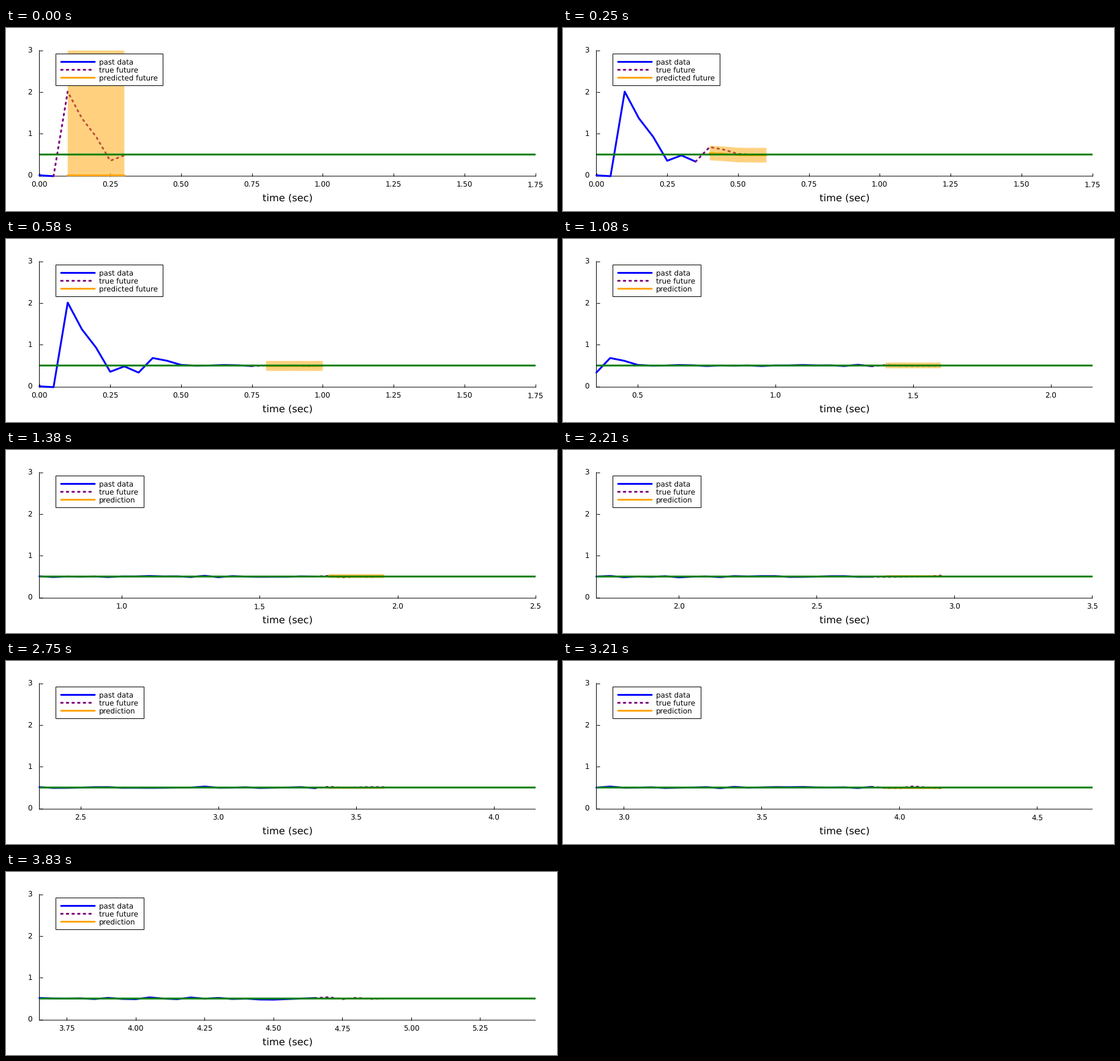
These frames come from a looping animation (900x300 px, 3.87 s). A matplotlib script:

```python
import math

import matplotlib.pyplot as plt
import numpy as np
from matplotlib.animation import FuncAnimation
from matplotlib.patches import Polygon, Rectangle

plt.rcParams.update({"font.family": "DejaVu Sans", "text.hinting": "none",
                     "path.snap": False})

W, H, DPI = 900, 300, 100
LOOP, TICK, FPS = 3870, 15, 24   # ms, ms, data steps per second
STEPS = 93
DT, AHEAD, GOAL = 0.05, 5, 0.5
SCROLL = 19                      # the view starts to follow the data here
LEFT, RIGHT, TOP, BOTTOM = 54.5, 864.5, 36.7, 242.9
YMIN, YMAX = -0.02, 3
PX = 72 / DPI
SMALL, LARGE = 11.9 * PX, 16.3 * PX

# Step response, then noise around the goal.
response = [0, -0.02, 2.01, 1.37, 0.93, 0.35, 0.48, 0.33, 0.68, 0.615, 0.515]
rng = np.random.default_rng(4)
count = STEPS + AHEAD + 1
noise = np.clip(rng.normal(0, 0.012, count - len(response)), -0.025, 0.025)
noise *= np.linspace(0.6, 1.2, len(noise))
truth = np.r_[response, GOAL + noise]
times = np.arange(count) * DT

fig = plt.figure(figsize=(W / DPI, H / DPI), dpi=DPI, facecolor="white")

ax = fig.add_axes([LEFT / W, 1 - BOTTOM / H, (RIGHT - LEFT) / W, (BOTTOM - TOP) / H])
ax.set_ylim(YMIN, YMAX)
ax.set_yticks(range(4))
ax.patch.set_visible(False)
ax.set_axisbelow(True)
ax.tick_params(direction="in", length=5 * PX, width=PX,
               labelleft=False, labelbottom=False)
for side, spine in ax.spines.items():
    spine.set_visible(side in ("left", "bottom"))
    spine.set_linewidth(PX)
    spine.set_zorder(0.6)

# Overlay in pixel units for the texts and the legend.
over = fig.add_axes([0, 0, 1, 1])
over.set_xlim(0, W)
over.set_ylim(H, 0)
over.axis("off")

SOLID = dict(lw=3 * PX, solid_capstyle="round", solid_joinstyle="round")
DASHED = dict(lw=3 * PX, ls=(0, (2.6 / 3, 6.6 / 3)),
              dash_capstyle="round", dash_joinstyle="round")


def label(x, y, s, ha="left", size=SMALL):
    return over.text(x, y, s, ha=ha, va="baseline", fontsize=size, color="black")


past, = ax.plot([], [], color="blue", zorder=2, clip_on=False, **SOLID)
future, = ax.plot([], [], color="purple", zorder=3, clip_on=False, **DASHED)
band = ax.add_patch(Polygon([[0, 0], [0, 1], [1, 1]], fc="orange", ec="none",
                            alpha=0.5, zorder=4))
guess, = ax.plot([], [], color="orange", zorder=5, clip_on=False, **SOLID)
ax.axhline(GOAL, color="green", lw=3 * PX, zorder=6)

for v in range(4):
    y = BOTTOM - (v - YMIN) / (YMAX - YMIN) * (BOTTOM - TOP)
    label(42.9, y + 4.2, str(v), "right")
label(459.8, 284, "time (sec)", "center", LARGE)
xlabels = [label(0, 261.3, "", "center") for _ in range(8)]

box = over.add_patch(Rectangle((81.5, 42.5), 175, 52, fc="white", ec="black",
                               lw=PX, zorder=1))
rows = [("blue", SOLID, "past data"), ("purple", DASHED, "true future"),
        ("orange", SOLID, "")]
for i, (color, style, name) in enumerate(rows):
    y = 55.5 + 13 * i
    over.plot([90, 145], [y, y], color=color, zorder=2, **style)
    last_name = label(152.4, y + 4.3, name)


def view(k):
    """Limits of the time axis."""
    if k < SCROLL:
        return 0, 1.75
    start = (k - SCROLL) * DT
    return start, start + 1.8


def multiples(step, lo, hi):
    first = math.ceil(lo / step - 1e-6)
    last = math.floor(hi / step + 1e-6)
    return [i * step for i in range(first, last + 1)]


def ticks(k):
    """Halves once the view scrolls and four of them fit, else quarters."""
    halves = multiples(0.5, *view(k))
    if k >= SCROLL and len(halves) >= 4:
        return halves, 1
    return multiples(0.25, *view(k)), 2


def predict(k, ahead):
    """Predicted values and half the width of the band."""
    trust = 1 - math.exp(-k / 1.2)
    drift = 0.012 * math.cos(math.tau * (k - 41) / 70)
    detail = 0.6 * math.exp(-k / 8)
    mean = trust * (GOAL + drift + detail * (ahead - GOAL))
    half = 0.228 * math.exp(-0.046 * k) + 3 * math.exp(-1.2 * k)
    return mean, half


def step_at(i):
    """Data step on show; steps begin on whole hundredths of a second."""
    t = (TICK * i + TICK - 1) // 10 * 10
    return (t + 4) * FPS // 1000


def draw(i):
    k = step_at(i)
    lo, hi = view(k)
    ax.set_xlim(lo, hi)
    marks, digits = ticks(k)
    ax.set_xticks(marks)
    for text in xlabels:
        text.set_text("")
    for text, mark in zip(xlabels, marks):
        text.set_x(LEFT + (mark - lo) / (hi - lo) * (RIGHT - LEFT))
        text.set_text(f"{mark:.{digits}f}")

    now = k + 1
    seen = slice(max(0, k - SCROLL), now + 1)
    coming = slice(now, now + AHEAD + 1)
    span = slice(now + 1, now + AHEAD + 1)
    past.set_data(times[seen], truth[seen])
    future.set_data(times[coming], truth[coming])

    t = times[span]
    mean, half = predict(k, truth[span])
    guess.set_data(t, mean)
    band.set_xy(np.column_stack([np.r_[t, t[::-1]],
                                 np.r_[mean + half, (mean - half)[::-1]]]))

    early = k < SCROLL
    box.set_width(175 if early else 144)
    last_name.set_text("predicted future" if early else "prediction")
    return []


anim = FuncAnimation(fig, draw, frames=LOOP // TICK, init_func=lambda: draw(0),
                     interval=TICK, repeat=True, repeat_delay=0, blit=False)
plt.show()
```
